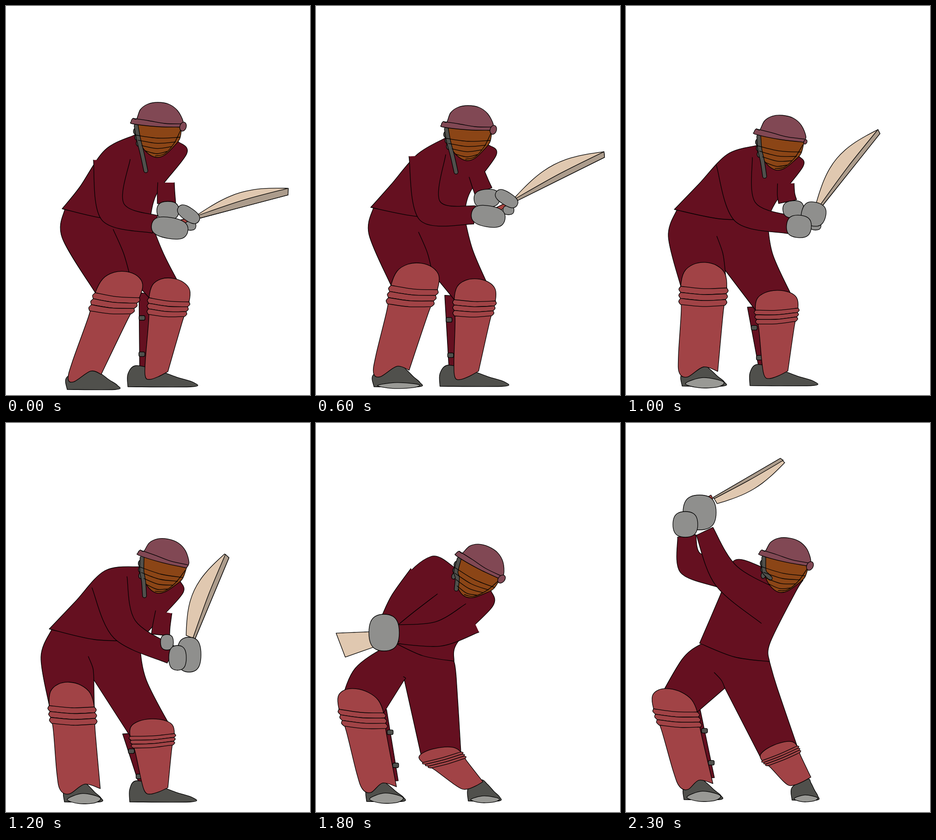
Animation of 661x848 px, one loop 2.4 s. Source, as an HTML page with a canvas:

```html
<!DOCTYPE html>
<html lang="en">
<head>
<meta charset="utf-8">
<title>Batsman</title>
<style>
html, body { margin: 0; width: 100%; height: 100%; overflow: hidden; background: #fff; }
canvas { display: block; width: 100vw; height: 100vh; }
</style>
</head>
<body>
<canvas id="stage" width="661" height="848"></canvas>
<script>
const ctx = document.getElementById('stage').getContext('2d');
const CLOTH = '#651020', PAD = '#a14346', GLOVE = '#8f8f8d', DARK = '#50504c';
const HELMET = '#814854', SKIN = '#8b4516', WOOD = '#e0c8b0', EDGE = '#ac9c8c';

/* Key poses.
   head: x, y, tilt, ear, strap     pads: knee left, knee right, ankle left, ankle right
   arms: shoulder, elbow, wrist     shoes: left, right, ground, peak, sole
   bat: x, y, angle, length, side, base, tip, belly, edge
   gloves: x, y, rx, ry, tilt       shins: how far each shows beside its pad */
const poses = [
  { at: 0, head: [330, 261, 0, 1, 98],
    back: [215, 314, 160, 395], hem: [122, 442, 313, 465], side: [330, 405], chest: [393, 322],
    hips: [122, 505, 345, 545], crotch: [270, 590], seam: [233, 487],
    near: [230, 335, 232, 448, 324, 476], far: [348, 385, 348, 405, 349, 430], farWidth: 18,
    padL: [194, 625, 290, 636, 135, 812, 207, 803], padR: [311, 636, 398, 645, 303, 808, 352, 797],
    shins: [-.2, .25], shoeL: [133, 242, 836, .45, 0], shoeR: [265, 408, 830, .12, 0],
    bat: [420, 463, -14.8, 204, 1, 9, 14, 20, 14],
    palm: [352, 446, 24, 20, 0], fist: [397, 454, 27, 14, 35], mitt: [356, 484, 40, 23, 10] },

  { at: 400, head: [332, 261, 0, 1, 98],
    back: [215, 322, 160, 392], hem: [122, 440, 320, 462], side: [338, 402], chest: [398, 322],
    hips: [122, 500, 350, 545], crotch: [266, 572], seam: [230, 491],
    near: [238, 322, 235, 445, 336, 463], far: [348, 372, 356, 394, 361, 416], farWidth: 18,
    padL: [182, 612, 282, 627, 136, 800, 211, 792], padR: [308, 637, 398, 646, 304, 808, 355, 796],
    shins: [-.2, .25], shoeL: [135, 231, 829, .6, 0], shoeR: [269, 410, 829, .12, 0],
    bat: [433, 443, -17.4, 214, 1, 10, 17, 19, 14],
    palm: [365, 431, 24, 20, 0], fist: [411, 438, 27, 14, 35], mitt: [370, 468, 39, 24, 10] },

  { at: 800, head: [329, 275, 0, 1, 90],
    back: [225, 325, 165, 388], hem: [116, 438, 325, 455], side: [333, 408], chest: [386, 328],
    hips: [108, 495, 335, 528], crotch: [240, 592], seam: [216, 495],
    near: [246, 330, 260, 447, 354, 448], far: [352, 362, 358, 378, 367, 391], farWidth: 18,
    padL: [144, 606, 246, 610, 114, 800, 194, 796], padR: [293, 643, 382, 640, 300, 810, 352, 796],
    shins: [-.2, .2], shoeL: [117, 221, 831, .5, 1], shoeR: [270, 411, 829, .12, 0],
    bat: [436, 409, -35.6, 226, 1, 6, 6, 31, 9],
    palm: [378, 408, 32, 20, -10], fist: [418, 402, 27, 14, 30], mitt: [379, 449, 35, 22, 10] },

  { at: 1200, head: [342, 303, 11, 0, 80],
    back: [215, 322, 150, 390], hem: [94, 449, 290, 475], side: [325, 437], chest: [384, 372],
    hips: [76, 510, 305, 560], crotch: [191, 560], seam: [179, 509],
    near: [225, 347, 258, 450, 360, 506], far: [343, 412, 338, 442, 336, 462], farWidth: 18,
    padL: [94, 616, 192, 619, 118, 800, 205, 797], padR: [270, 683, 366, 677, 303, 805, 352, 795],
    shins: [-.2, .15], shoeL: [127, 206, 826, .45, 1], shoeR: [269, 406, 826, .1, 0],
    bat: [411, 471, -67.4, 196, 1, 21, 12, 26, 10],
    palm: [350, 478, 14, 17, 0], fist: [398, 505, 26, 38, 0], mitt: [373, 512, 19, 27, 0] },

  { at: 1400, head: [349, 307, 16, 0, 78], reach: .6,
    back: [222, 302, 155, 392], hem: [88, 450, 324, 545], side: [375, 472], chest: [386, 400],
    hips: [74, 505, 297, 585], crotch: [183, 573], seam: [170, 513],
    near: [228, 335, 224, 432, 258, 528], far: [350, 420, 340, 470, 302, 531], farWidth: 36,
    padL: [80, 618, 182, 625, 104, 800, 190, 798], padR: [243, 708, 336, 688, 308, 808, 350, 790],
    shins: [-.2, -.2], shoeL: [114, 191, 827, .47, 1], shoeR: [324, 402, 828, .33, 0],
    bat: [341, 566, 18.5, 129, -1, 35, 14, 6, 10],
    palm: [292, 552, 12, 12, 0], fist: [317, 573, 25, 29, 0], mitt: [281, 557, 32, 40, 0] },

  { at: 1800, head: [354, 316, 24, 1, 62], reach: .35, ease: 2,
    back: [250, 291, 185, 353], hem: [165, 476, 300, 519], side: [308, 478], chest: [384, 400],
    hips: [85, 535, 305, 555], crotch: [192, 560], seam: [190, 553],
    near: [235, 345, 188, 394, 160, 430], far: [340, 425, 265, 460, 169, 460], farWidth: 34,
    padL: [50, 624, 147, 632, 101, 798, 175, 793], padR: [232, 740, 315, 717, 318, 798, 363, 782],
    shins: [.08, -.2], shoeL: [110, 190, 825, .35, 1], shoeR: [331, 399, 824, .4, .6],
    bat: [133, 486, 160.6, 75, -1, 33, 56, 0, 0],
    palm: [150, 450, 12, 12, 0], fist: [150, 447, 12, 12, 0], mitt: [148, 457, 33, 40, 0] },

  { at: 2300, head: [346, 301, 9, 1, 42],
    back: [235, 300, 205, 375], hem: [160, 480, 312, 520], side: [313, 480], chest: [368, 370],
    hips: [122, 515, 328, 575], crotch: [215, 578], seam: [192, 544],
    near: [205, 318, 140, 305, 132, 246], far: [318, 402, 218, 333, 171, 236], farWidth: 42,
    padL: [60, 623, 155, 630, 116, 792, 189, 786], padR: [296, 736, 372, 704, 354, 790, 402, 772],
    shins: [.08, -.2], shoeL: [126, 206, 821, .4, 1], shoeR: [361, 417, 822, .6, .6],
    bat: [190, 162, 329.7, 172, -1, 16, 13, 14, 7],
    palm: [155, 195, 12, 12, 0], fist: [160, 195, 36, 38, 0], mitt: [129, 221, 27, 28, 0] }
];

const mix = (a, b, u) => Array.isArray(a) ? a.map((v, i) => mix(v, b[i], u)) : a + (b - a) * u;
const corner = p => [p[0], p[1], 1];

function poseAt(t) {
  const i = poses.findLastIndex(p => p.at <= t), a = poses[i], b = poses[i + 1];
  if (!b) return a;
  const u = 1 - (1 - (t - a.at) / (b.at - a.at)) ** (a.ease || 1);
  const pose = {};
  for (const key in b) if (key in a && key !== 'ease' && key !== 'reach') pose[key] = mix(a[key], b[key], u);
  pose.bat[3] *= 1 + (a.reach || 0) * Math.sin(Math.PI * u);
  return pose;
}

function paint(fill) {
  if (fill) { ctx.fillStyle = fill; ctx.fill(); }
  ctx.stroke();
}

// Smooth curve through points; a truthy third value makes a sharp corner
function curve(pts, fill, open) {
  const n = pts.length, last = open ? n - 1 : n;
  const at = i => open ? pts[Math.max(0, Math.min(n - 1, i))] : pts[(i + n) % n];
  ctx.beginPath();
  ctx.moveTo(pts[0][0], pts[0][1]);
  for (let i = 0; i < last; i++) {
    const b = at(i), c = at(i + 1), a = b[2] ? b : at(i - 1), d = c[2] ? c : at(i + 2);
    ctx.bezierCurveTo(b[0] + (c[0] - a[0]) / 6, b[1] + (c[1] - a[1]) / 6,
      c[0] - (d[0] - b[0]) / 6, c[1] - (d[1] - b[1]) / 6, c[0], c[1]);
  }
  if (!open) ctx.closePath();
  paint(fill);
}

function placed(x, y, tilt, body) {
  ctx.save();
  ctx.translate(x, y);
  ctx.rotate(tilt * Math.PI / 180);
  body();
  ctx.restore();
}

function onPad(k, u, v, sharp) {
  const top = mix([k[0], k[1]], [k[2], k[3]], u), low = mix([k[4], k[5]], [k[6], k[7]], u);
  return [...mix(top, low, v), sharp];
}

function shin(k, edge, show) {
  const out = edge ? 1 + show : -show, strip = v => onPad(k, out, v);
  curve([corner(strip(-.05)), corner(strip(.92)), onPad(k, .5, .92, 1), onPad(k, .5, -.05, 1)], CLOTH);
  for (const v of [.26, .71]) {
    const [x, y] = onPad(k, out + (edge ? -.02 : .06), v);
    ctx.beginPath();
    ctx.roundRect(x - 5, y - 5, 13, 10, 3);
    paint(DARK);
  }
}

function pad(k, notch) {
  const at = (u, v, sharp) => onPad(k, u, v, sharp);
  const dome = [];
  for (let i = 0; i <= 6; i++) {
    const a = Math.PI * i / 6;
    dome.push(at(.5 - Math.cos(a) / 2, -.29 * Math.sin(a) ** .8));
  }
  curve([...dome, at(.98, .28), at(1, 1, 1), at(.62, 1 - notch), at(.22, 1.05), at(0, 1), at(-.03, .8), at(.02, .28)], PAD);
  for (let i = 0; i < 3; i++) {
    const v = i * .07, w = v + .07, m = v + .035;
    curve([at(0, v, 1), at(.5, v + .018), at(1, v, 1), at(1.04, m), at(1, w, 1), at(.5, w + .018), at(0, w, 1), at(-.04, m)], PAD);
  }
}

function shoe([left, right, ground, peak, sole]) {
  const at = (u, v, sharp) => [left + (right - left) * u, ground + v * 46, sharp];
  const slope = u => peak + (1 - peak) * u;
  curve([at(0, 0, 1), at(0, -.6), at(peak, -1), at(slope(.35), -.8), at(slope(.7), -.46), at(1, -.2), at(.97, 0)], DARK);
  if (sole) curve([at(.08, -.12 * sole), at(.5, -.4 * sole), at(.98, -.2 * sole), at(.85, .04), at(.4, .08)], '#999995');
}

function limb([sx, sy, ex, ey, wx, wy], width) {
  const a = Math.atan2(ey - sy, ex - sx), b = Math.atan2(wy - ey, wx - ex);
  const mid = Math.atan2(Math.sin(a) + Math.sin(b), Math.cos(a) + Math.cos(b));
  const off = (x, y, dir, w, sharp) => [x - Math.sin(dir) * w, y + Math.cos(dir) * w, sharp];
  const bend = (width + 20) / 2;
  curve([off(sx, sy, a, width), off(ex, ey, mid, bend), off(wx, wy, b, 20, 1),
    off(wx, wy, b, -20, 1), off(ex, ey, mid, -bend), off(sx, sy, a, -width)], CLOTH, true);
}

function glove([x, y, rx, ry, tilt]) {
  placed(x, y, tilt, () => {
    const soft = v => Math.sign(v) * Math.abs(v) ** .8, pts = [];
    for (let a = 0; a < 6.2; a += Math.PI / 6) pts.push([rx * soft(Math.cos(a)), ry * soft(Math.sin(a))]);
    curve(pts, GLOVE);
  });
}

function bat([x, y, angle, length, side, base, tip, belly, edge]) {
  placed(x, y, angle, () => {
    const width = u => base + (tip - base) * u + belly * Math.sin(Math.PI * u);
    const blade = [[0, 0, 1]];
    for (let u = 0; u <= 1; u += .125) blade.push([length * u, -side * width(u), u === 0 || u === 1]);
    curve([...blade, [length * .98, 0, 1]], WOOD);
    if (edge) curve([[0, 0, 1], [0, -side * edge / 2, 1], [length / 2, -side * edge],
      [length, -side * Math.min(tip, edge), 1], [length * .98, 0, 1]], EDGE);
  });
}

function handle([x, y, angle]) {
  placed(x, y, angle, () => {
    ctx.beginPath();
    ctx.rect(-48, -7, 46, 9);
    paint('#a84440');
  });
}

function head([x, y, tilt, ear, strap]) {
  placed(x, y, tilt, () => {
    curve([[-45, -3, 1], [52, 3, 1], [48, 28], [35, 45], [15, 64], [-4, 69], [-24, 58], [-39, 36]], SKIN);
    for (let i = 0; i < 3; i++) {
      ctx.beginPath();
      ctx.ellipse(-48 + 3 * i, 12 + 13 * i, 5, 7, 0, 0, 7);
      paint(DARK);
    }
    const band = [[-47, 0], [-42, 28], [-34, Math.max(36, strap * .62)], [-26, strap]];
    for (const [colour, width] of [['#000', 10], [DARK, 7.5]]) {
      ctx.strokeStyle = colour;
      ctx.lineWidth = width;
      curve(band, null, true);
    }
    ctx.strokeStyle = '#000';
    ctx.lineWidth = 1.3;
    for (let i = 0; i < 4; i++) {
      const u = i / 3;
      curve(mix([[-50, 20], [0, 27], [48, 25]], [[-27, 55], [-2, 61], [20, 56]], u), null, true);
    }
    curve([[50, 9], [35, 39], [15, 61], [-5, 66]], null, true);
    curve([[-46, -15], [-38, -35], [-22, -47], [0, -51], [24, -47], [43, -33], [55, -10],
      [52, 3, 1], [0, 2], [-54, -4], [-58, -9], [-54, -16]], HELMET);
    curve([[-54, -16], [-20, -11], [15, -5], [53, -4]], null, true);
    if (ear) {
      ctx.beginPath();
      ctx.ellipse(55, 2, 7 * ear, 10 * ear, .3, 0, 7);
      paint(HELMET);
    }
  });
}

function shirt(p) {
  const [x, y, tilt] = p.head, a = tilt * Math.PI / 180;
  const neck = (u, v) => [x + u * Math.cos(a) - v * Math.sin(a), y + u * Math.sin(a) + v * Math.cos(a), 1];
  const [lx, ly, rx, ry] = p.hem;
  curve([neck(-50, 20), p.back.slice(0, 2), p.back.slice(2), [lx, ly, 1], [(lx + rx) / 2, (ly + ry) / 2 + 10],
    [rx, ry, 1], p.side, p.chest, neck(45, 35)], CLOTH);
}

function pants(p) {
  const [lx, ly, rx, ry] = p.hem, [ax, ay, bx, by] = p.hips;
  curve([[lx + 6, ly, 1], [ax, ay], onPad(p.padL, 0, 0, 1), onPad(p.padL, 1, 0, 1), corner(p.crotch),
    onPad(p.padR, 0, 0, 1), onPad(p.padR, 1, 0, 1), [bx, by], [rx, ry, 1]], CLOTH);
  const [sx, sy] = p.seam, [cx, cy] = p.crotch;
  curve([p.seam, [(sx + cx) / 2 + 4, (sy + cy) / 2], p.crotch], null, true);
}

// Bounces in along the ground and is struck back
function ball(t) {
  if (t < 1300 || t > 1700) return;
  const out = Math.max(0, t - 1600);
  const x = Math.min(t - 1300, 300) * .75 - out * 1.5;
  const y = 789 - Math.abs(t - 1400) * .4 - out;
  ctx.beginPath();
  ctx.arc(x + .5, y + .5, 15, 0, 7);
  paint('#cc0000');
}

function draw(t) {
  const p = poseAt(t);
  ctx.fillStyle = '#fff';
  ctx.fillRect(0, 0, 661, 848);
  ctx.strokeStyle = '#000';
  ctx.lineWidth = 1.3;
  ctx.lineJoin = ctx.lineCap = 'round';

  shin(p.padL, 1, p.shins[0]);
  shin(p.padR, 0, p.shins[1]);
  pants(p);
  shoe(p.shoeL);
  shoe(p.shoeR);
  pad(p.padL, .06);
  pad(p.padR, -.04);
  shirt(p);
  limb(p.near, 40);
  limb(p.far, p.farWidth);
  bat(p.bat);
  glove(p.palm);
  handle(p.bat);
  glove([p.fist[0] + 4, p.fist[1] + 25, 12, 10, 0]);
  glove(p.fist);
  glove(p.mitt);
  head(p.head);
  ball(t);
}

const start = performance.now();
let shown = -1;
function tick() {
  const t = Math.floor((performance.now() - start) % 2400 / 100) * 100;
  if (t !== shown) draw(shown = t);
  requestAnimationFrame(tick);
}
tick();
</script>
</body>
</html>
```
